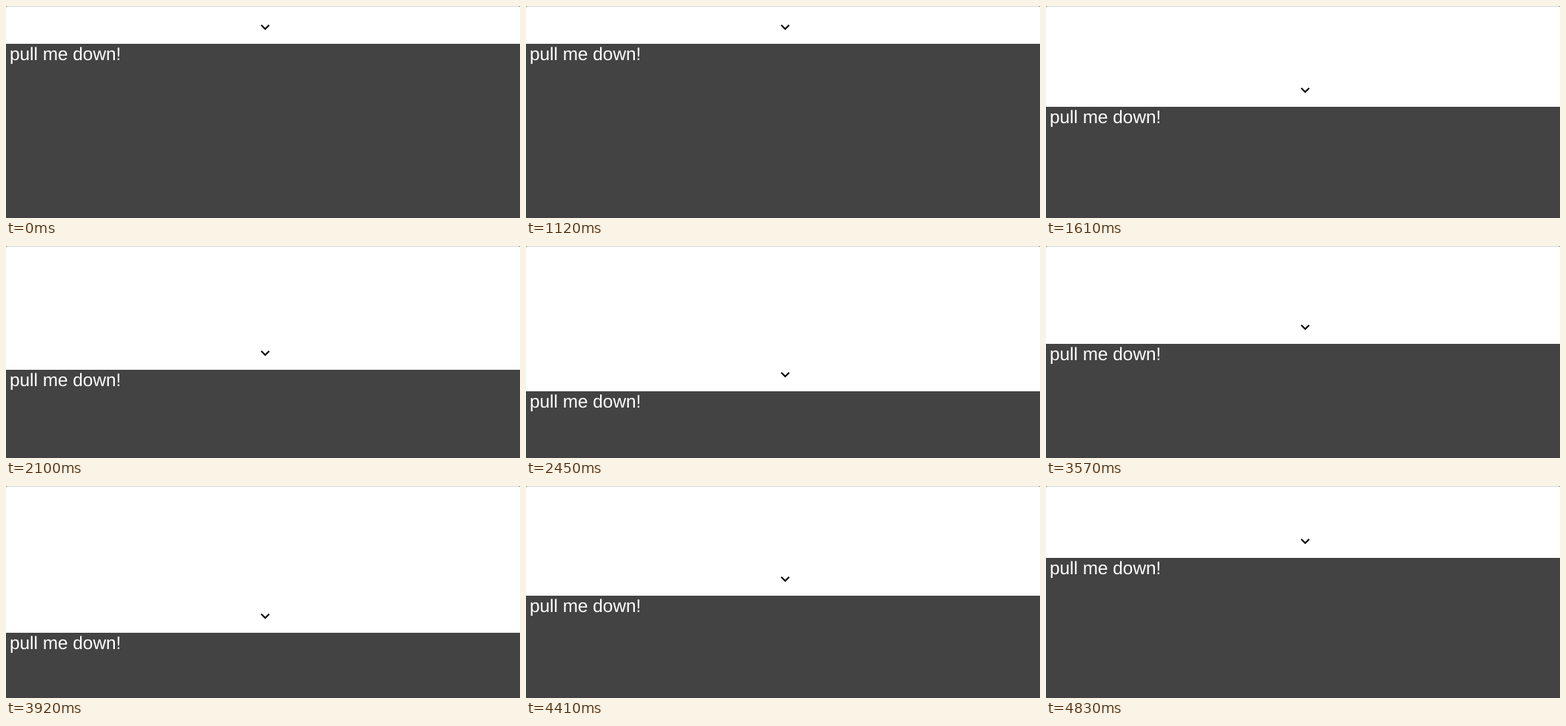
An HTML page for the animation above (5.32 s loop, 694 by 286 pixels).

```html
<!DOCTYPE html>
<html lang="en">
<head>
<meta charset="utf-8">
<title>Pull down</title>
<style>
  html, body { margin: 0; width: 100%; height: 100%; overflow: hidden; background: #444; }
  svg { display: block; width: 694px; height: 286px; }
  text {
    font: 24.4px "Liberation Sans", Arial, sans-serif;
    text-rendering: geometricPrecision;
    fill: #fff;
  }
</style>
</head>
<body>
<svg viewBox="0 0 694 286">
  <rect width="694" height="286" rx="2" fill="#d9d9d9"/>
  <rect y="1" width="694" height="285" fill="#fff"/>
  <g id="panel" transform="translate(0 51)">
    <path transform="translate(338 -33.8)" d="M7.41 7.84 12 12.42l4.59-4.58L18 9.25l-6 6-6-6z"/>
    <rect width="694" height="286" fill="#434343"/>
    <text x="4.9" y="22">pull me down!</text>
  </g>
  <rect y="285" width="694" height="1" fill="#463f43"/>
</svg>
<script>
  const LOOP = 5320, STEP = 70;
  // Where the hand pauses or turns: time, top edge of the panel.
  const keys = [
    [0, 51], [1120, 51], [1610, 136], [1750, 146],
    [1890, 146], [2380, 199], [2450, 196], [2800, 117], [3010, 101],
    [3360, 101], [3920, 198],
    [4200, 198], [4620, 98], [4690, 98], [4760, 97], [LOOP, 97]
  ];
  const panel = document.getElementById('panel');

  const slope = i => (keys[i + 1][1] - keys[i][1]) / (keys[i + 1][0] - keys[i][0]);

  // Harmonic mean of the neighbouring slopes; zero at rests and turns.
  function tangent(i) {
    if (i === 0 || i === keys.length - 1) return 0;
    const a = slope(i - 1), b = slope(i);
    return a * b > 0 ? 2 * a * b / (a + b) : 0;
  }

  // Smooth monotone curve through the keys.
  function edgeAt(t) {
    const i = keys.findIndex(key => key[0] > t) - 1;
    const [t0, y0] = keys[i], [t1, y1] = keys[i + 1];
    const span = t1 - t0, s = (t - t0) / span, r = 1 - s;
    return y0 + (y1 - y0) * s * s * (3 - 2 * s)
      + span * s * r * (r * tangent(i) - s * tangent(i + 1));
  }

  const begin = performance.now();
  function draw(now) {
    const t = Math.max(0, now - begin) % LOOP;
    const edge = Math.round(edgeAt(Math.floor(t / STEP) * STEP));
    panel.setAttribute('transform', `translate(0 ${edge})`);
    requestAnimationFrame(draw);
  }
  draw(begin);
</script>
</body>
</html>
```
